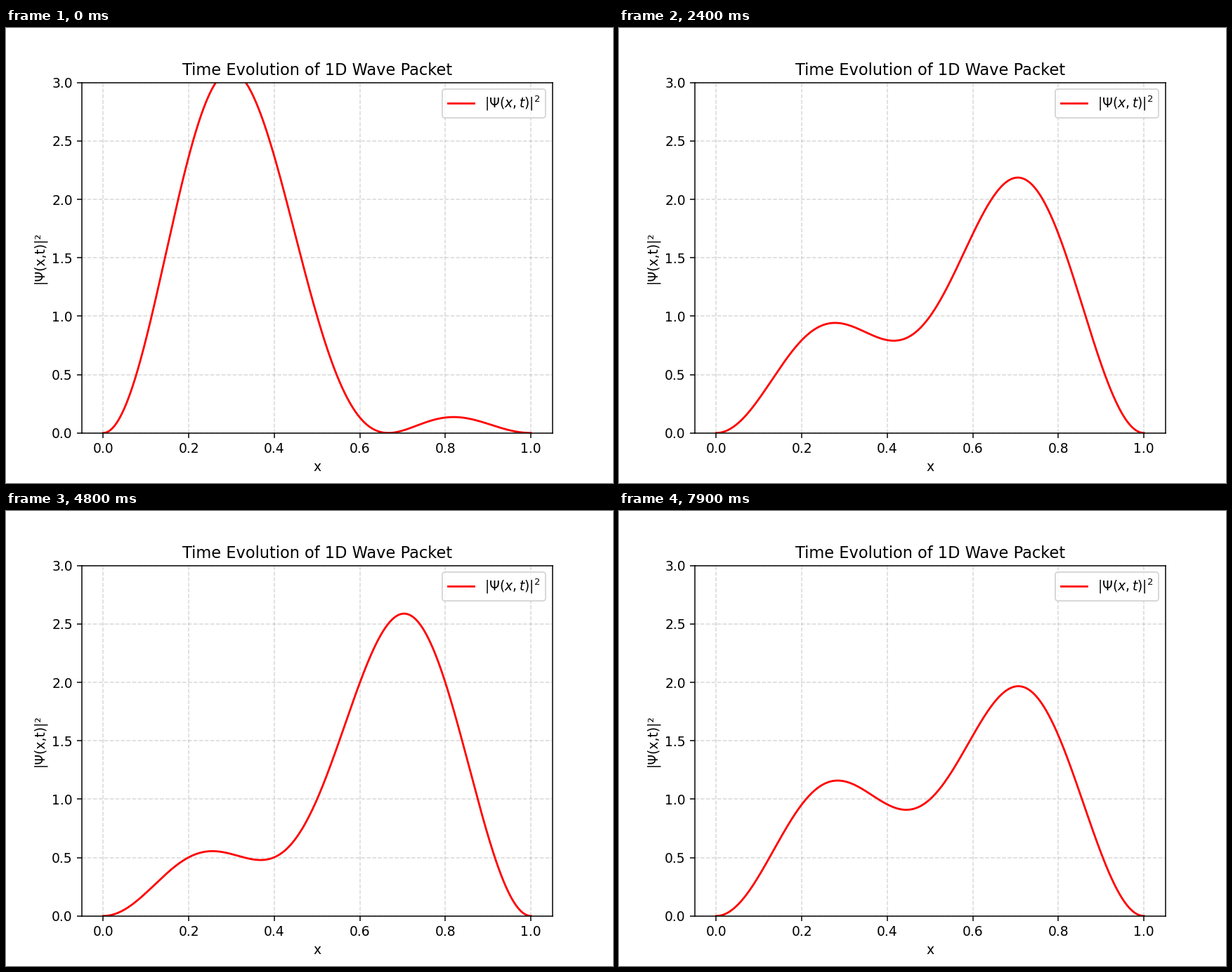
These frames come from a looping animation (864 px wide and 648 px high, 8000 ms). A matplotlib script:

```python
import matplotlib.pyplot as plt
import numpy as np
from matplotlib.animation import FuncAnimation

FRAMES = 80
INTERVAL = 100            # ms
DT = 20 / 199             # model time per frame

x = np.linspace(0, 1, 500)


def energy(n):
    return (n * np.pi) ** 2 / 2


def state(n, t):
    """Stationary state of the unit box (hbar = m = 1)."""
    return np.sqrt(2) * np.sin(n * np.pi * x) * np.exp(-1j * energy(n) * t)


def density(t):
    psi = (state(1, t) + state(2, t)) / np.sqrt(2)
    return np.abs(psi) ** 2


fig, ax = plt.subplots(figsize=(6.4, 4.8), dpi=135)
line, = ax.plot(x, density(0), color="red", lw=1.5, label=r"$|\Psi(x,t)|^2$")
ax.set_xlim(-0.05, 1.05)
ax.set_ylim(0, 3)
ax.set_xlabel("x")
ax.set_ylabel("|Ψ(x,t)|²")
ax.set_title("Time Evolution of 1D Wave Packet")
ax.grid(True, linestyle="--", alpha=0.5)
ax.legend(loc="upper right")


def update(frame):
    line.set_ydata(density(frame * DT))
    return line,


anim = FuncAnimation(fig, update, frames=FRAMES, interval=INTERVAL,
                     repeat=True, repeat_delay=0, blit=False)
plt.show()
```
